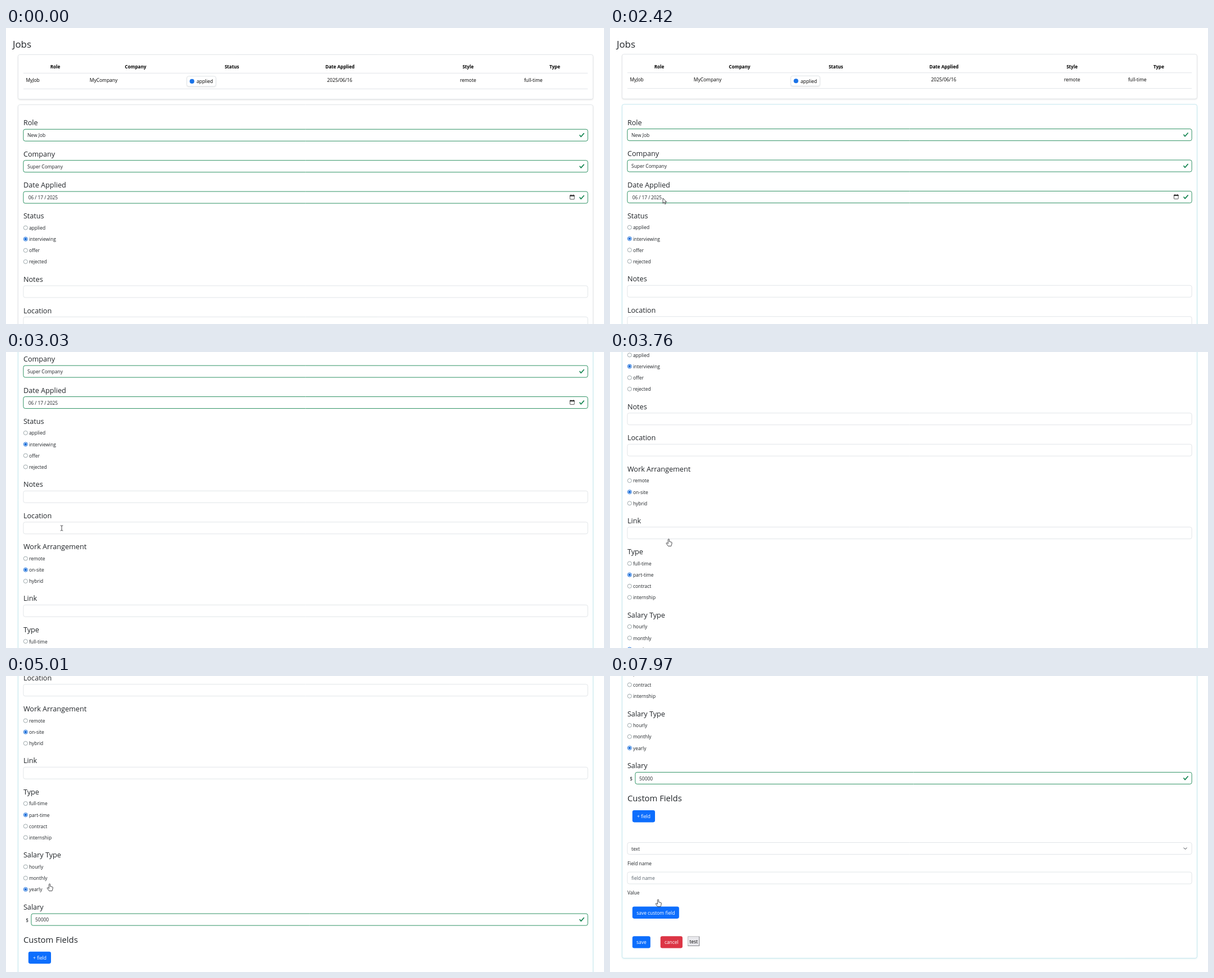
Animation, 1063 px wide and 527 px high, one loop 7990 ms. Source, as an HTML page with a canvas:

```html
<!DOCTYPE html>
<html lang="en">
<head>
<meta charset="utf-8">
<title>Jobs</title>
<style>
  html, body { margin: 0; width: 100%; height: 100%; overflow: hidden; background: #fff; }
  canvas { display: block; }
</style>
</head>
<body>
<canvas id="stage" width="1063" height="527"></canvas>
<script>
const ctx = document.getElementById('stage').getContext('2d');
const LOOP = 7990, OPEN_AT = 6955;
const INK = '#212529', GRAY = '#dee2e6', GREEN = '#198754', BLUE = '#0d6efd';
const LEFT = 30.9, RIGHT = 1034.2, BODY = 8.45, H4 = 12.67, H3 = 14.8, H2 = 16.9;

// rows of [time, value, ...]
const scrollKeys = [
  [0, 0], [2400, 0], [2420, 0.6], [3030, 211.3], [3700, 350.2], [3860, 350.2],
  [4350, 452], [4880, 452], [5010, 499.3], [5250, 580.2], [7080, 580.2],
  [7940, 751.4], [LOOP, 751.4]
];
const pointerKeys = [
  [230, 1009, 520], [1010, 270, 338], [1400, 72, 210], [1730, 94, 303], [2420, 94, 303],
  [3030, 99, 313.5], [3760, 104.3, 333], [3860, 104.3, 333], [5010, 77.5, 370],
  [5250, 78, 375], [5350, 78, 375], [5750, 45, 405], [6140, 97.5, 390], [6240, 97.5, 390],
  [6550, 106, 402], [6880, 72, 418], [7080, 72, 418], [7960, 85.5, 398], [LOOP, 85.5, 398]
];

const clamp01 = v => Math.max(0, Math.min(1, v));

// monotone cubic through the keys, so that held values stay still
function sample(keys, t, col) {
  const last = keys.length - 1;
  if (t <= keys[0][0]) return keys[0][col];
  if (t >= keys[last][0]) return keys[last][col];
  let i = 0;
  while (t >= keys[i + 1][0]) i++;
  const slope = k => (keys[k + 1][col] - keys[k][col]) / (keys[k + 1][0] - keys[k][0]);
  const tangent = k => {
    if (k === 0 || k === last) return 0;
    const a = slope(k - 1), b = slope(k);
    return a * b <= 0 ? 0 : 2 * a * b / (a + b);
  };
  const h = keys[i + 1][0] - keys[i][0], u = (t - keys[i][0]) / h;
  const a = keys[i][col], b = keys[i + 1][col], s = u * u * (3 - 2 * u);
  return a + (b - a) * s + h * u * (1 - u) * ((1 - u) * tangent(i) - u * tangent(i + 1));
}

function mix(from, to, k) {
  return `rgb(${from.map((v, i) => Math.round(v + (to[i] - v) * k)).join()})`;
}

function text(str, x, cy, { size = BODY, color = INK, weight = 400, align = 'left' } = {}) {
  ctx.font = `${weight} ${size}px "Open Sans", "Noto Sans", sans-serif`;
  ctx.textAlign = align;
  ctx.fillStyle = color;
  ctx.fillText(str, x, cy + size * 0.38);
}

function box(x, y, w, h, { fill, stroke, line = 0.9, r = 3.3 } = {}) {
  ctx.beginPath();
  ctx.roundRect(x, y, w, h, r);
  if (fill) { ctx.fillStyle = fill; ctx.fill(); }
  if (stroke) { ctx.strokeStyle = stroke; ctx.lineWidth = line; ctx.stroke(); }
}

function disc(x, y, r, color) {
  ctx.fillStyle = color;
  ctx.beginPath();
  ctx.arc(x, y, r, 0, 7);
  ctx.fill();
}

function card(x, y, w, h, stroke, glow = 'rgba(0,0,0,.12)') {
  ctx.save();
  ctx.shadowColor = glow;
  ctx.shadowBlur = 3;
  ctx.shadowOffsetY = 1.2;
  box(x, y, w, h, { fill: '#fff' });
  ctx.restore();
  box(x, y, w, h, { stroke });
}

function rule(y) {
  ctx.fillStyle = GRAY;
  ctx.fillRect(LEFT, y, RIGHT - LEFT, 0.9);
}

const tick = new Path2D('M2.3 6.73.6 4.53c-.4-1.04.46-1.4 1.1-.8l1.1 1.4 3.4-3.8c.6-.63 1.6-.27 1.2.7l-4 4.6c-.43.5-.8.4-1.1.1z');

function input(y, value = '', { valid = false, x = LEFT, color = INK } = {}) {
  box(x, y, RIGHT - x, 21, { fill: '#fff', stroke: valid ? GREEN : GRAY });
  text(value, x + 7.1, y + 10.9, { color });
  if (!valid) return;
  ctx.save();
  ctx.translate(1018.6, y + 5.4);
  ctx.scale(1.256, 1.256);
  ctx.fillStyle = GREEN;
  ctx.fill(tick);
  ctx.restore();
}

const heading = (str, cy, size = H4) => text(str, LEFT, cy, { size });

function field(label, cy, value, valid) {
  heading(label, cy);
  input(cy + 11.7, value, { valid });
}

function radios(label, cy, options, chosen) {
  heading(label, cy);
  options.forEach((name, i) => {
    const y = cy + 21 + i * 20.15, on = i === chosen, color = on ? '#0f68d8' : '#7d8c90';
    ctx.beginPath();
    ctx.arc(34.8, y, 3.55, 0, 7);
    ctx.strokeStyle = color;
    ctx.lineWidth = on ? 0.95 : 0.75;
    ctx.stroke();
    if (on) disc(34.8, y, 2.2, color);
    text(name, 40.9, y + 0.2);
  });
}

function button(label, x, y, w, fill) {
  box(x, y, w, 21.4, { fill });
  text(label, x + w / 2, y + 10.8, { color: '#fff', align: 'center' });
}

function calendar(x, y) {
  ctx.fillStyle = '#2b2b2b';
  ctx.fillRect(x, y + 1, 8.4, 2);
  ctx.fillRect(x + 1.5, y, 1, 1.5);
  ctx.fillRect(x + 5.9, y, 1, 1.5);
  box(x + 0.4, y + 1.4, 7.6, 7, { stroke: '#2b2b2b', line: 0.8, r: 0.6 });
}

function jobTable() {
  text('Jobs', 11.9, 28.8, { size: H2 });
  card(21.5, 47.4, 1022, 79.4, GRAY);
  const heads = [['Role', 87.5], ['Company', 230.3], ['Status', 401.5],
    ['Date Applied', 593.7], ['Style', 821.3], ['Type', 975.5]];
  for (const [name, x] of heads)
    text(name, x, 69.4, { size: 8.1, weight: 700, color: '#000', align: 'center' });
  rule(79.9);
  const cells = [['MyJob', 35.4], ['MyCompany', 148.8], ['2025/06/16', 570.8],
    ['remote', 807], ['full-time', 921]];
  for (const [value, x] of cells) text(value, x, 92.9, { color: '#000' });
  card(321.5, 85.9, 51.6, 18, GRAY);
  disc(330.6, 94.9, 4.1, '#1a73e8');
  text('applied', 338.8, 95.2, { color: '#000' });
  rule(107.9);
}

function customForm() {
  input(1047.9, 'text');
  ctx.strokeStyle = '#343a40';
  ctx.lineWidth = 1;
  ctx.beginPath();
  ctx.moveTo(1019.7, 1057);
  ctx.lineTo(1022.6, 1059.9);
  ctx.lineTo(1025.5, 1057);
  ctx.stroke();
  text('Field name', LEFT, 1084.8);
  input(1100.5, 'field name', { color: '#59636c' });
  text('Value', LEFT, 1137.5);
  button('save custom field', 39.8, 1161.9, 83, BLUE);
}

function jobForm(t) {
  const open = t >= OPEN_AT, shift = open ? 171.2 : 0;
  const lit = clamp01((t - 220) / 250);
  card(21.5, 136.6, 1022, 946 + shift, mix([222, 226, 230], [190, 229, 236], lit),
    lit ? 'rgba(40,150,170,.16)' : undefined);

  field('Role', 168.6, 'New Job', true);
  field('Company', 224, 'Super Company', true);
  field('Date Applied', 279.4, '', true);
  [['06', 39.7], ['/', 51.2], ['17', 56.4], ['/', 68.2], ['2025', 72.9]]
    .forEach(([part, x]) => text(part, x, 302));
  calendar(1002.2, 296.6);
  radios('Status', 334.6, ['applied', 'interviewing', 'offer', 'rejected'], 1);
  field('Notes', 447.2);
  field('Location', 502.7);
  radios('Work Arrangement', 558.2, ['remote', 'on-site', 'hybrid'], 1);
  field('Link', 650.2);
  radios('Type', 705.7, ['full-time', 'part-time', 'contract', 'internship'], 1);
  radios('Salary Type', 818.2, ['hourly', 'monthly', 'yearly'], 2);
  heading('Salary', 910.8);
  text('$', 35.2, 934);
  input(922.8, '50000', { valid: true, x: 44.9 });
  heading('Custom Fields', 968.6, H3);

  const hover = clamp01((t - 6760) / 150) * (1 - clamp01((t - 7100) / 150));
  button('+ field', 39.8, 990.4, 40.2, mix([13, 110, 253], [11, 94, 215], hover));
  if (open) customForm();

  const y = 1043.4 + shift;
  button('save', 39.8, y, 32, BLUE);
  button('cancel', 89.7, y, 39.2, '#dc3545');
  ctx.fillStyle = '#6b6b70';
  ctx.fillRect(138.2, y + 0.5, 21, 17);
  ctx.fillStyle = '#c9c9ce';
  ctx.fillRect(138.2, y + 0.5, 20, 16);
  ctx.fillStyle = '#e9e9ed';
  ctx.fillRect(139, y + 1.3, 19.2, 15.2);
  text('test', 148.7, y + 9.3, { color: '#000', align: 'center' });
}

const shapes = {
  arrow: new Path2D('M0 0V9.3L2.2 7.3 3.7 10.6 5.2 9.9 3.7 6.7H6.6Z'),
  hand: new Path2D('M-1.1 1.1A1.1 1.1 0 0 1 1.1 1.1V4.6L4.6 5.3Q5.9 5.7 5.8 7L5.2 10.3 4.4 12.6H-.9L-4.3 7.7Q-4.1 6.2-2.6 6.9L-1.1 8.2Z'),
  beam: new Path2D('M-2.3-4.6Q0-4.6 0-3.6Q0-4.6 2.3-4.6M0-3.6V3.6M-2.3 4.6Q0 4.6 0 3.6Q0 4.6 2.3 4.6')
};

function pointer(t) {
  if (t < 230) return;
  const kind = t < 270 || (t > 2700 && t < 3500) ? 'beam' : t < 3500 ? 'arrow' : 'hand';
  ctx.save();
  ctx.translate(sample(pointerKeys, t, 1), sample(pointerKeys, t, 2));
  if (kind !== 'beam') {
    ctx.fillStyle = '#fff';
    ctx.fill(shapes[kind]);
  }
  ctx.strokeStyle = '#26282b';
  ctx.lineWidth = 0.85;
  ctx.lineJoin = 'round';
  ctx.stroke(shapes[kind]);
  ctx.restore();
}

function draw(t) {
  ctx.fillStyle = '#fff';
  ctx.fillRect(0, 0, 1063, 527);
  ctx.save();
  ctx.translate(0, -sample(scrollKeys, t, 1));
  jobTable();
  jobForm(t);
  ctx.restore();
  pointer(t);
}

const start = performance.now();
function frame() {
  draw((performance.now() - start) % LOOP);
  requestAnimationFrame(frame);
}
frame();
</script>
</body>
</html>
```
